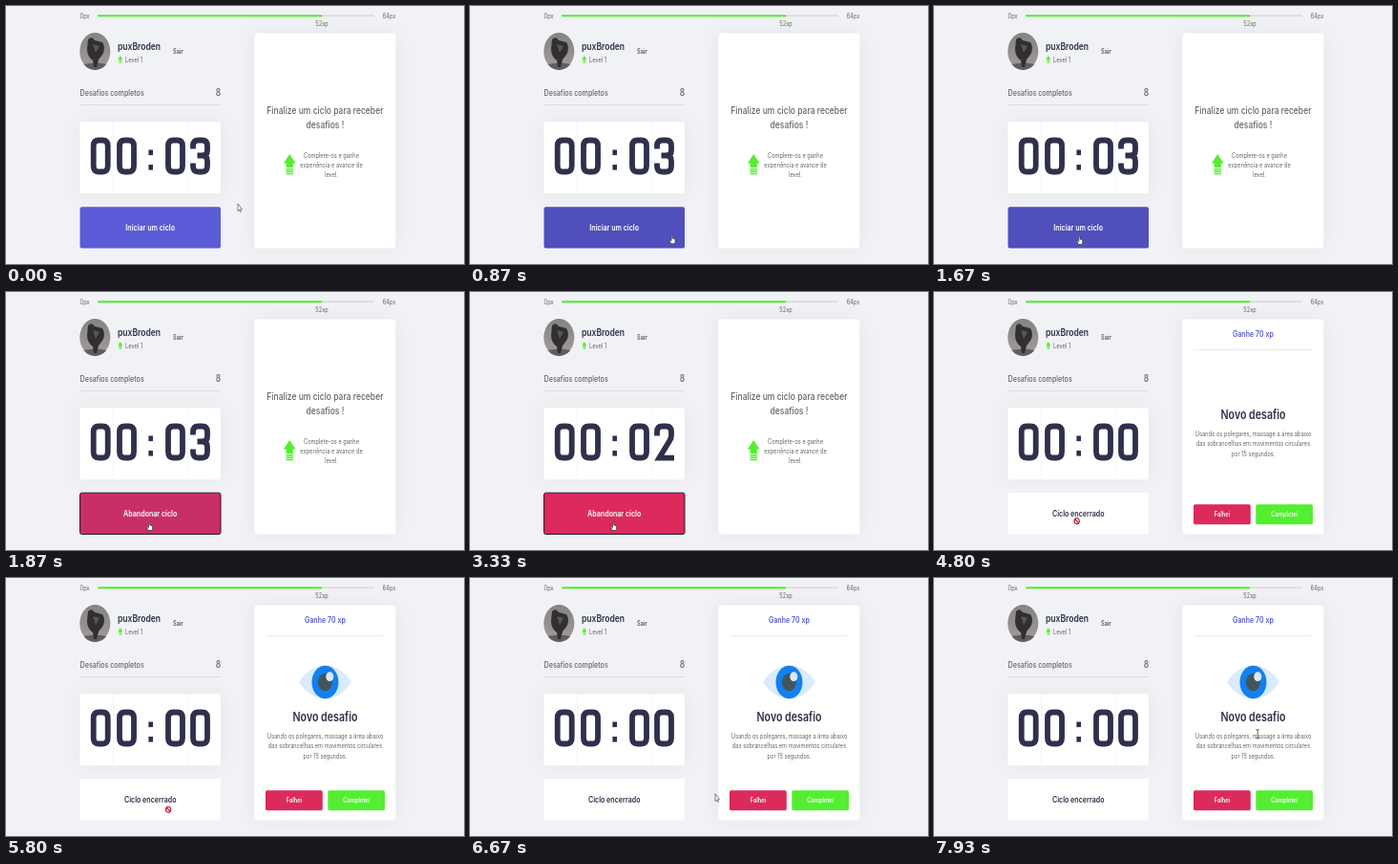
Animation of 480 by 270 pixels, one loop 8000 ms. Source, as an HTML page:

```html
<!DOCTYPE html>
<html lang="pt-BR">
<head>
<meta charset="utf-8">
<style>
html, body { margin: 0; width: 100%; height: 100%; overflow: hidden; background: #f1f2f5; }
svg { display: block; width: 100vw; height: 100vh; }
text { font-family: Inter, "Open Sans", sans-serif; }
.card { fill: #fff; filter: drop-shadow(0 0 10px #0000000d); }
.digits { fill: none; stroke: #2e304c; stroke-width: 5.8; }
</style>
</head>
<body>
<svg id="stage" viewBox="0 0 480 270"></svg>
<script>
const GREEN = '#53ee30', RED = '#db2a5b', DARK = '#2e304a', GREY = '#666';
const BLUE_RGB = [91, 91, 216], HOVER_RGB = [80, 79, 188], RED_RGB = [219, 42, 91];

// The whole page is shown narrower than tall: one scale for all text.
const label = (x, y, str, size, weight = 400, fill = GREY, anchor = 'middle', id = '') =>
  `<text ${id && `id="${id}"`} transform="translate(${x} ${y}) scale(.3556 .433)" font-size="${size}"
    font-weight="${weight}" fill="${fill}" text-anchor="${anchor}">${str}</text>`;
const lines = (x, y, step, size, weight, rows) =>
  rows.map((row, i) => label(x, y + i * step, row, size, weight)).join('');
const rect = (x, y, w, h, fill, more = '') =>
  `<rect x="${x}" y="${y}" width="${w}" height="${h}" fill="${fill}" ${more}/>`;
const ellipse = (x, y, rx, ry, fill) =>
  `<ellipse cx="${x}" cy="${y}" rx="${rx}" ry="${ry}" fill="${fill}"/>`;
const levelUp = (x, y, k) => `<g transform="translate(${x} ${y}) scale(${k})" fill="${GREEN}">
  <path d="M0 0L6.3 9.5H3.6V14H-3.6V9.5H-6.3Z"/>
  ${[14.9, 17.3, 19.7].map(v => rect(-3.8, v, 7.6, 1.6, GREEN)).join('')}</g>`;

const DIGITS = {
  0: 'M3 9Q3 3 8.5 3H12.5Q18 3 18 9V30Q18 36 12.5 36H8.5Q3 36 3 30Z',
  1: 'M5 8.5L12 3.5V39',
  2: 'M3 13V9Q3 3 8.5 3H12.5Q18 3 18 9V12.5Q18 15.5 16.3 18L5.3 36.1H21',
  3: 'M3 12V9Q3 3 8.5 3H12.5Q18 3 18 9V14Q18 19 12.5 19H7.5M12.5 19Q18 19 18 24.5V30Q18 36 12.5 36H8.5Q3 36 3 30V27'
};
const digit = (x, id = '') =>
  `<path ${id && `id="${id}"`} d="${DIGITS[0]}" transform="translate(${x} 137.5)"/>`;

const CURSORS = {
  arrow: '<path d="M0 0V7.6L1.4 6.2L2.4 8.6L3.5 8.1L2.6 5.8H4.3Z" fill="#fff" stroke="#333" stroke-width=".6"/>',
  hand: `<path d="M-.6 .4Q0-.5 .6 .4V3.5L3.3 4.4Q3.8 6.5 2.9 9H-.9L-2.6 5.8Q-2.4 4.8-.6 6Z"
    fill="#fff" stroke="#222" stroke-width=".6"/>`,
  ban: `<g fill="#fff" stroke="#c2213f" stroke-width="1.3" transform="translate(-.5 -.8)">
    <ellipse rx="2.6" ry="3"/><path d="M-1.9-2L1.9 2"/></g>`,
  beam: '<path d="M-1.8-4.5H1.8M-1.8 4.5H1.8M0-4.5V4.5" fill="none" stroke="#444" stroke-width=".8"/>'
};

document.getElementById('stage').innerHTML = `
<defs>
  <clipPath id="round"><ellipse cx="93.3" cy="47.6" rx="16" ry="19.5"/></clipPath>
  <linearGradient id="sky" x2="0" y2="1"><stop stop-color="#858383"/><stop offset="1" stop-color="#a09d9b"/></linearGradient>
</defs>
${rect(0, 0, 480, 270, '#f1f2f5')}
${rect(96, 9.2, 290, 2, '#dcdde0', 'rx="1"')}${rect(96, 9.2, 235.3, 2, GREEN, 'rx="1"')}
${label(77.6, 13, '0px', 16, 400, GREY, 'start')}${label(408.3, 13, '64px', 16, 400, GREY, 'end')}
${label(331, 21, '52xp', 16)}
<g clip-path="url(#round)">
  ${rect(77, 28, 33, 40, 'url(#sky)')}
  <path d="M77 62Q94 57 110 62V68H77Z" fill="#625d5b"/>
  <path d="M86 35Q90 31 93 36L101 38Q105 44 101 51L97 56L95 64H92L91 57Q85 53 85 45Z" fill="#332e2e"/>
  <path d="M91 40L98 42L94 49Z" fill="#5b5555"/>
</g>
${label(117, 46, 'puxBroden', 24, 600, DARK, 'start')}
${levelUp(119.8, 52, .37)}${label(125, 59, 'Level 1', 16, 400, GREY, 'start')}
${label(175, 50.3, 'Sair', 16, 600, '#555', 'start')}
${label(77.6, 94, 'Desafios completos', 20, 500, GREY, 'start')}
${label(225, 94.3, '8', 24, 500, GREY, 'end')}
${rect(77.6, 103.2, 147.4, .7, '#d3d4d9')}

${rect(77.5, 121.3, 147.5, 75, '#fff', 'class="card" rx="2"')}
${rect(112.3, 121.3, .7, 75, '#eeeff2')}${rect(190.6, 121.3, .7, 75, '#eeeff2')}
<g class="digits">${digit(88.7)}${digit(116)}${digit(167)}${digit(193, 'seconds')}</g>
${rect(149.4, 150.5, 4.6, 5.6, DARK)}${rect(149.4, 166, 4.6, 5.6, DARK)}

${rect(77.5, 210.2, 147.5, 43.3, '#fff', 'id="button" rx="2"')}
${label(151.2, 235, '', 20, 600, '#fff', 'middle', 'action')}

${rect(260.5, 28.5, 147.7, 225, '#fff', 'class="card" rx="2"')}
<g id="idle">
  ${lines(334.4, 113, 14.5, 24, 500, ['Finalize um ciclo para receber', 'desafios !'])}
  ${levelUp(297.2, 155, 1)}
  ${lines(341, 159.3, 9.6, 16, 400, ['Complete-os e ganhe', 'experiência e avance de', 'level.'])}
</g>
<g id="challenge">
  ${label(334.4, 47.4, 'Ganhe 70 xp', 20, 600, '#5b5bd3')}
  ${rect(272, 60, 125, .7, '#e2e3e6')}
  <g id="eye">
    <path d="M307 109Q319 91.5 334.5 91.5T362 109Q350 126.5 334.5 126.5T307 109Z" fill="#d8eafc"/>
    ${ellipse(334.5, 109, 14, 17.2, '#1380f0')}${ellipse(334.5, 109, 7.6, 9.2, '#47535f')}
    ${ellipse(339.3, 103.2, 4, 4.9, '#d8eafc')}
  </g>
  <g id="task">
    ${label(334.5, 132.6, 'Novo desafio', 30, 600, DARK)}
    ${lines(334.5, 150.8, 10.4, 16, 400, ['Usando os polegares, massage a área abaixo', 'das sobrancelhas em movimentos circulares', 'por 15 segundos.'])}
  </g>
  ${rect(272, 222.3, 59.8, 21, RED, 'rx="1.7"')}${label(302, 235.4, 'Falhei', 16, 600, '#fff')}
  ${rect(337.3, 222.3, 59.7, 21, GREEN, 'rx="1.7"')}${label(367.2, 235.4, 'Completei', 16, 600, '#fff')}
</g>
<g id="cursor">${Object.entries(CURSORS).map(([k, v]) => `<g id="${k}">${v}</g>`).join('')}</g>`;

const el = id => document.getElementById(id);
const show = (id, on) => el(id).style.display = on ? '' : 'none';
const clamp = v => Math.min(1, Math.max(0, v));
const mix = (a, b, p) => a.map((v, i) => v + (b[i] - v) * clamp(p));

const CLICK = 1740, DONE = 4800, EYE = 5070, HOVER = 610;
const PATH = [ // time, x, y
  [0, 243, 207], [270, 243, 207], [870, 211.8, 239.7], [1700, 150.2, 240.5], [5620, 150.2, 240.5],
  [6000, 193, 246], [6470, 247, 236], [6670, 257, 226], [6900, 275, 207], [7270, 282, 171],
  [7450, 282, 171], [7930, 339.2, 163.3], [8000, 339.2, 163.3]
];

function pointer(t) {
  const i = PATH.findIndex(p => p[0] > t), a = PATH[i - 1], b = PATH[i];
  return mix(a, b, (t - a[0]) / (b[0] - a[0])).slice(1);
}

function draw(t) {
  const done = t >= DONE, clicked = t >= CLICK, eye = t >= EYE;
  const [x, y] = pointer(t);

  el('seconds').setAttribute('d', DIGITS[t < 2800 ? 3 : t < 3800 ? 2 : done ? 0 : 1]);

  const hover = mix(BLUE_RGB, HOVER_RGB, (t - HOVER) / 200);
  const fill = done ? [255, 255, 255] : mix(hover, RED_RGB, (t - CLICK) / 150);
  const button = el('button');
  button.setAttribute('fill', `rgb(${fill})`);
  button.setAttribute('stroke', clicked && !done ? '#2a1a2c' : 'none');
  el('action').textContent = done ? 'Ciclo encerrado' : clicked ? 'Abandonar ciclo' : 'Iniciar um ciclo';
  el('action').setAttribute('fill', done ? DARK : '#fff');

  show('idle', !done);
  show('challenge', done);
  show('eye', eye);
  el('task').setAttribute('transform', `translate(0 ${eye ? 17 : 0})`);

  const onButton = x < 225 && y > 210;
  const kind = onButton ? (done ? 'ban' : 'hand') : eye && x > 273 && y < 190 ? 'beam' : 'arrow';
  for (const k in CURSORS) show(k, k === kind);
  el('cursor').setAttribute('transform', `translate(${x} ${y})`);
}

function frame() {
  draw(performance.now() % 8000);
  requestAnimationFrame(frame);
}
frame();
</script>
</body>
</html>
```
